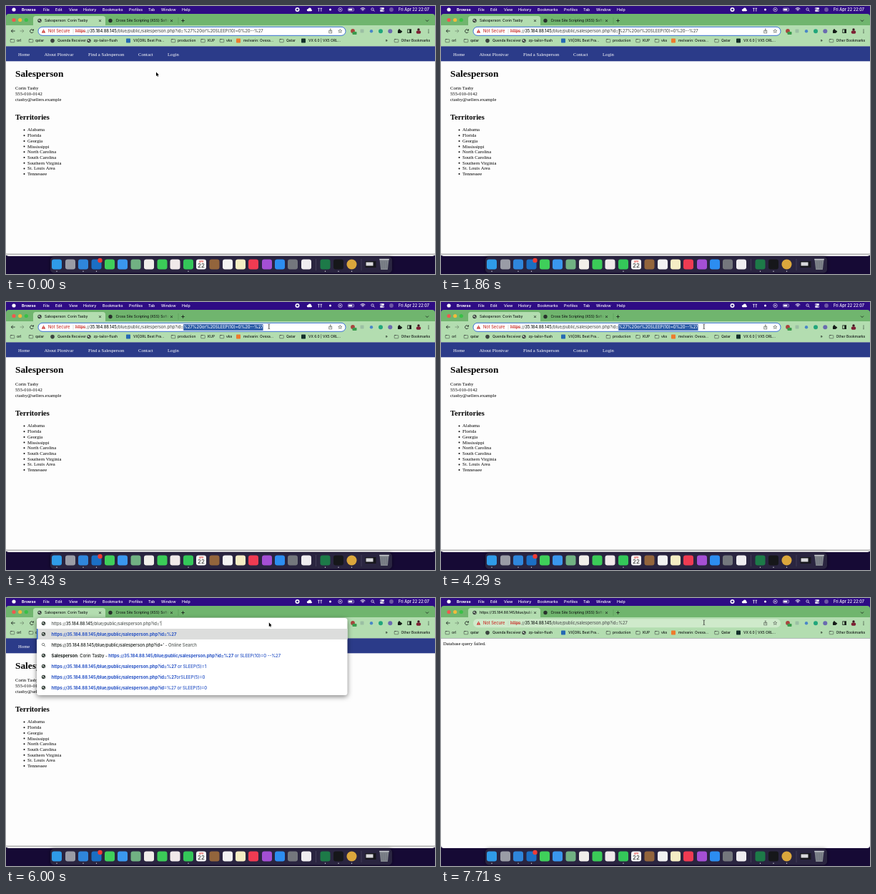
Write an HTML page with a canvas that moves like this. It is 600x375 px and loops after 8000 ms.

```html
<!DOCTYPE html>
<html lang="en">
<head>
<meta charset="utf-8">
<title>Salesperson</title>
<style>
html, body { margin: 0; width: 100%; height: 100%; overflow: hidden; background: #160a35; }
canvas { display: block; width: 600px; height: 375px; }
</style>
</head>
<body>
<canvas id="stage"></canvas>
<script>
const W = 600, H = 375, LOOP = 8000;
const canvas = document.getElementById('stage');
const ctx = canvas.getContext('2d');
const dpr = window.devicePixelRatio || 1;
canvas.width = W * dpr;
canvas.height = H * dpr;

const SANS = 'Inter, Roboto, sans-serif';
const SERIF = '"Liberation Serif", "Times New Roman", serif';
const INK = '#141a17', GRAY = '#525855', RED = '#c9302a', BLUE = '#2450c4';
const STRIP = '#70b56e', BAR = '#b3ddb0', MENU = '#2e0c84';

const HOST = '35.184.88.145';
const PATH = '/blue/public/salesperson.php?id=';
const URL_BASE = 'https://' + HOST + PATH;
const INJECTED = '%27%20or%20SLEEP(10)=0%20--%27';
const PERSON = 'Corin Tasby';
const URL_SIZE = 5.8, ROW_SIZE = 5.97;

// Times of the hard changes, in ms
const MOVE_END = 1500, DRAG = 1950, DRAG_END = 2430, RELEASE = 2860;
const TYPE = 5140, ENTER = 7000, FAILED = 7570;

const clamp = v => Math.max(0, Math.min(1, v));
const ease = v => v * v * (3 - 2 * v);
const mix = (a, b, k) => a + (b - a) * k;

function font(size, weight = 500, family = SANS) {
  ctx.font = `${weight} ${size}px ${family}`;
}

// Draws text centred vertically on y and returns its right edge
function text(s, x, y, size, color = INK, weight = 500, family = SANS) {
  font(size, weight, family);
  ctx.fillStyle = color;
  ctx.fillText(s, x, y + size * 0.35);
  return x + ctx.measureText(s).width;
}

function runs(parts, x, y, size) {
  for (const [s, color, weight] of parts) x = text(s, x, y, size, color, weight);
  return x;
}

function rect(x, y, w, h, color) {
  ctx.fillStyle = color;
  ctx.fillRect(x, y, w, h);
}

function round(x, y, w, h, r, color) {
  ctx.beginPath();
  ctx.roundRect(x, y, w, h, r);
  ctx.fillStyle = color;
  ctx.fill();
}

function shadowed(x, y, w, h, r, color, blur, drop) {
  ctx.save();
  ctx.shadowColor = 'rgba(0,0,0,.5)';
  ctx.shadowBlur = blur * dpr;
  ctx.shadowOffsetY = drop * dpr;
  round(x, y, w, h, r, color);
  ctx.restore();
}

function dot(x, y, r, color) {
  ctx.beginPath();
  ctx.arc(x, y, r, 0, 7);
  ctx.fillStyle = color;
  ctx.fill();
}

function arc(x, y, r, a, b, color, width = 0.7) {
  ctx.beginPath();
  ctx.arc(x, y, r, a, b);
  ctx.strokeStyle = color;
  ctx.lineWidth = width;
  ctx.stroke();
}

function line(points, color = INK, width = 0.8) {
  ctx.beginPath();
  for (let i = 0; i < points.length; i += 2) ctx.lineTo(points[i], points[i + 1]);
  ctx.strokeStyle = color;
  ctx.lineWidth = width;
  ctx.stroke();
}

function shape(points, color) {
  ctx.beginPath();
  for (let i = 0; i < points.length; i += 2) ctx.lineTo(points[i], points[i + 1]);
  ctx.closePath();
  ctx.fillStyle = color;
  ctx.fill();
}

function cross(x, y, r, color = INK) {
  line([x - r, y - r, x + r, y + r], color);
  line([x - r, y + r, x + r, y - r], color);
}

function fade(x0, x1) {
  const g = ctx.createLinearGradient(x0, 0, x1, 0);
  g.addColorStop(0, INK);
  g.addColorStop(1, 'rgba(20,26,23,0)');
  return g;
}

function globe(x, y) {
  dot(x, y, 2.7, '#333c38');
  shape([x - 2, y - 0.8, x - 0.2, y - 1.8, x + 0.6, y - 0.4, x - 0.8, y + 0.8], '#d3ded2');
  shape([x + 0.2, y + 0.9, x + 1.9, y + 0.1, x + 1, y + 1.9], '#d3ded2');
}

function folder(x) {
  ctx.beginPath();
  ctx.roundRect(x - 2.8, 46.6, 5.6, 4.2, 0.6);
  ctx.strokeStyle = '#465048';
  ctx.lineWidth = 0.6;
  ctx.stroke();
  rect(x - 2.8, 46, 2.4, 0.9, '#465048');
}

function lens(x, y, color) {
  arc(x - 0.5, y - 0.5, 1.7, 0, 7, color);
  line([x + 0.7, y + 0.7, x + 2.4, y + 2.4], color);
}

function menuBar() {
  rect(0, 0, W, 28, MENU);
  const c = '#fff';
  dot(11, 5, 2.6, c);
  text('Browse', 22, 5, 5.4, c, 700);
  const items = [['File', 52], ['Edit', 69], ['View', 88], ['History', 108], ['Bookmarks', 135],
    ['Profiles', 172], ['Tab', 199], ['Window', 217], ['Help', 246]];
  for (const [s, x] of items) text(s, x, 5, 5.3, c);
  dot(407.5, 5, 3, c);
  round(406.3, 3.8, 2.4, 2.4, 0.4, MENU);
  dot(422.5, 5.6, 1.6, c);
  dot(424.8, 4.6, 2.2, c);
  round(421, 5, 7, 2.2, 1.1, c);
  for (const x of [437.4, 440.8]) {
    line([x - 1.3, 3.3, x + 1.3, 3.3], c);
    line([x, 3.3, x, 7.6], c);
  }
  dot(453.5, 5, 1.5, c);
  arc(467.5, 5, 2.7, 0, 7, c, 0.6);
  shape([466.7, 3.7, 468.9, 5, 466.7, 6.3], c);
  ctx.beginPath();
  ctx.roundRect(478.5, 3, 8, 4, 1);
  ctx.strokeStyle = c;
  ctx.lineWidth = 0.5;
  ctx.stroke();
  rect(479.3, 3.8, 5, 2.4, c);
  for (const r of [1.6, 3.2, 4.8]) arc(499, 7.4, r, -2.35, -0.8, c, 0.9);
  lens(513, 5, c);
  for (const y of [3.5, 6.6]) {
    round(523, y - 1.2, 6, 2.4, 1.2, c);
    dot(y < 5 ? 524.3 : 527.7, y, 0.7, MENU);
  }
  dot(539, 5, 2.9, '#6e58a4');
  text('Fri Apr 22 22:07', 549, 5, 5.6, c);
}

function tabs(t) {
  round(0, 11, W, 30, [4, 4, 0, 0], STRIP);
  dot(11, 19.5, 2.6, '#f0584f');
  dot(19.7, 19.5, 2.6, '#f2bc3a');
  dot(28.3, 19.5, 2.6, '#39c046');
  round(38, 14, 101, 18, 3.5, BAR);
  if (t >= ENTER && t < FAILED) {
    const a = t / 130;
    arc(47, 20.5, 2.4, a, a + 1.5, '#8cae8d', 0.6);
  } else globe(47, 20.5);
  text(t < FAILED ? 'Salesperson: ' + PERSON : 'https://35.184.88.145/blue/public', 54, 20.7, 4.95, fade(121, 129));
  cross(131.5, 20.6, 1.4);
  dot(146, 20.5, 2.7, '#28302c');
  text('Cross Site Scripting (XSS) Software', 153.5, 20.7, 4.95, fade(218, 228));
  cross(231.5, 20.6, 1.4);
  line([241, 16, 241, 25], '#4d8d4c', 0.4);
  line([245.2, 20.5, 249.8, 20.5]);
  line([247.5, 18.2, 247.5, 22.8]);
  line([587, 19.5, 589, 21.5, 591, 19.5]);
}

function toolbar(t) {
  rect(0, 27, W, 29.5, BAR);
  line([12.6, 35, 7.4, 35]);
  line([9.7, 32.6, 7.3, 35, 9.7, 37.4]);
  line([19.6, 35, 24.8, 35], '#728b70');
  line([22.5, 32.6, 24.9, 35, 22.5, 37.4], '#728b70');
  if (t >= ENTER && t < FAILED) cross(36, 35, 2.1);
  else {
    arc(36, 35.2, 2.4, 0.4, 5.4, INK, 0.8);
    shape([36.4, 34.4, 38.8, 34.4, 38.8, 32], INK);
  }
  address(t);

  dot(485, 35, 2.9, '#a9443d');
  round(484.5, 36, 6, 4, 0.8, '#3a9b4c');
  round(495.5, 32.5, 5, 5, 1, '#9bbfa3');
  dot(511, 35.2, 2.2, '#4a86c8');
  dot(524, 35.2, 3, '#21a67b');
  dot(537.3, 35.2, 3, '#6a6bb0');
  round(548, 33.8, 4.6, 4.2, 0.4, INK);
  dot(550, 33.4, 1.2, INK);
  dot(553, 35.8, 1.1, INK);
  ctx.strokeStyle = INK;
  ctx.lineWidth = 0.8;
  ctx.strokeRect(561.8, 32.8, 4.8, 4.8);
  rect(564.2, 32.8, 2.4, 4.8, INK);
  dot(577, 33, 1.7, '#3a1420');
  round(573.8, 34.4, 6.4, 4.4, 1.8, '#7d1f33');
  for (const y of [33, 35.2, 37.4]) dot(591, y, 0.6, INK);

  bookmarks();
}

function address(t) {
  const focused = t < ENTER;
  round(45, 29.3, 430, 12, 6, focused ? '#fff' : '#cfeacb');
  if (focused) {
    ctx.strokeStyle = '#3a70d4';
    ctx.lineWidth = 1;
    ctx.stroke();
  }
  const y = 35.3;
  if (t >= ENTER && t < FAILED) {
    arc(52.5, 35.2, 2.4, 0, 7, GRAY, 0.6);
    line([52.5, 34.8, 52.5, 36.7], GRAY);
    dot(52.5, 33.8, 0.4, GRAY);
    runs([[HOST, INK], [PATH + '%27', GRAY]], 59, y, URL_SIZE);
  } else {
    shape([52.5, 32.6, 55.2, 37.4, 49.8, 37.4], RED);
    rect(52.2, 34.2, 0.6, 1.6, '#fff');
    rect(52.2, 36.3, 0.6, 0.6, '#fff');
    text('Not Secure', 59, y, 5.7, RED);
    line([94, 32, 94, 38.6], '#b8c0b8', 0.5);
    const x = text('https', 97, y, URL_SIZE, RED);
    line([97, 35.6, x, 35.6], RED, 0.5);
    const end = runs([['://', GRAY], [HOST, INK], [PATH, GRAY]], x, y, URL_SIZE);
    text(t < ENTER ? INJECTED : '%27', end, y, URL_SIZE, GRAY);
    if (t >= DRAG && t < TYPE) selection(t, end, y);
  }
  ctx.strokeStyle = '#4a534b';
  ctx.lineWidth = 0.6;
  ctx.strokeRect(451.8, 34.3, 4, 3.6);
  line([453.8, 36.3, 453.8, 31.8], '#4a534b', 0.6);
  line([452.6, 33, 453.8, 31.8, 455, 33], '#4a534b', 0.6);
  const star = [];
  for (let i = 0; i <= 10; i++) {
    const r = i % 2 ? 1.2 : 2.7, a = i * Math.PI / 5 - Math.PI / 2;
    star.push(467.3 + r * Math.cos(a), 35.2 + r * Math.sin(a));
  }
  line(star, '#4a534b', 0.6);
}

function selection(t, x, y) {
  font(URL_SIZE);
  const reach = pointer(t).x - x;
  let n = 0;
  while (n < INJECTED.length && ctx.measureText(INJECTED.slice(0, n + 1)).width <= reach) n++;
  if (t >= DRAG_END) n = INJECTED.length;
  const part = INJECTED.slice(0, n);
  rect(x, 31, ctx.measureText(part).width, 8.8, '#2b5ba6');
  text(part, x, y, URL_SIZE, '#eef3fb');
}

function bookmarks() {
  const y = 48.6;
  // [label, text x, icon x, icon colour, square]; no colour means a folder
  const items = [
    ['orl', 15, 9], ['qatar', 41, 35], ['Quenda Receiver', 72, 65, '#3c4440'],
    ['zp-tailor-flush', 122.5, 116, 'globe'], ['VX|ORL Best Pra...', 178, 171, '#2569b3', 1],
    ['production', 240, 234], ['KUP', 282, 275.5], ['vks', 308, 302],
    ['melvarin: Ovexa...', 332, 325, '#ee7b2d', 1], ['Qatar', 392, 385.5],
    ['VX 6.0 | VX5 ORL...', 423, 416, '#122f2a', 1], ['Other Bookmarks', 552.5, 546]
  ];
  for (const [s, x, ix, color, square] of items) {
    if (!color) folder(ix);
    else if (color === 'globe') globe(ix, y);
    else if (square) round(ix - 3, y - 3, 6, 6, 0.8, color);
    else dot(ix, y, 2.8, color);
    text(s, x, y, 4.9);
  }
  text('»', 530.5, y - 0.3, 5.5);
}

function page(t) {
  round(0, 56.5, W, 293.5, [0, 0, 4, 4], '#fdfdfd');
  const serif = (s, x, y, size = 6.67, color = '#000', weight = 400) => text(s, x, y, size, color, weight, SERIF);
  if (t >= FAILED) {
    serif('Database query failed.', 3, 64);
    return;
  }
  rect(0, 56.5, W, 20.8, '#2b3b89');
  const links = [['Home', 17], ['About Plonivar', 53.5], ['Find a Salesperson', 115], ['Contact', 185], ['Login', 226]];
  for (const [s, x] of links) serif(s, x, 67.5, 6.67, '#fff');
  serif('Salesperson', 13, 94, 13.33, '#000', 700);
  [PERSON, '555-010-0142', 'ctasby@sellers.example'].forEach((s, i) => serif(s, 13, 114.8 + i * 7.7));
  serif('Territories', 13, 155.5, 10.45, '#000', 700);
  const places = ['Alabama', 'Florida', 'Georgia', 'Mississippi', 'North Carolina', 'South Carolina',
    'Southern Virginia', 'St. Louis Area', 'Tennessee'];
  places.forEach((s, i) => {
    const y = 173.1 + i * 7.7;
    dot(25.5, y + 0.4, 1, '#000');
    serif(s, 30, y);
  });
  rect(0, 346, W, 3, '#dedede');
  rect(0, 346.8, W, 1, '#b4b4b4');
}

function popup() {
  shadowed(43, 28, 434.5, 108, 3.5, '#fff', 7, 2);
  rect(43, 43, 434.5, 15, '#dcdddc');
  round(43, 43, 1.5, 15, [0, 1, 1, 0], '#2f6ad6');
  const x = 63.5;
  globe(52.5, 35.5);
  const caret = runs([['https://', GRAY], [HOST, INK], [PATH + "'", GRAY]], x, 35.5, URL_SIZE);
  line([caret + 0.4, 32, caret + 0.4, 38.6], INK, 0.5);
  const hit = [URL_BASE + '%27', BLUE, 700];
  const rows = [
    [hit],
    [[URL_BASE + "'", INK], [' - Online Search', GRAY]],
    [['Salesperson', INK, 700], [': ' + PERSON + ' - ', INK], hit, [' or SLEEP(10)=0 --%27', BLUE]],
    [hit, [' or SLEEP(5)=1', BLUE]],
    [hit, ['orSLEEP(5)=0', BLUE]],
    [[URL_BASE.slice(0, -1), BLUE, 700], ['=%27 or SLEEP(5)=0', BLUE]]
  ];
  rows.forEach((row, i) => {
    const y = 50.5 + i * 15;
    if (i === 1) lens(52.5, y, GRAY);
    else globe(52.5, y);
    runs(row, x, y, ROW_SIZE);
  });
}

function dock() {
  shadowed(62, 351, 478, 22.5, 5, '#2a2540', 5, 0);
  const icons = [
    [71, '#2f9be8'], [90, '#9a9ca6'], [108, '#2f86dc'], [126.5, '#1b6fc4'], [145, '#3fcf5a'],
    [163, '#3a97ee'], [181.5, '#71b183'], [200, '#f1eeea'], [218.5, '#3bcb58'], [236.5, '#f0e9ea'],
    [255, '#34c759'], [273, '#f8f8f8'], [291.5, '#93653c'], [310, '#f2f2f2'], [328, '#f5edc4'],
    [346, '#ef3b52'], [365, '#a44fd4'], [383, '#2c8df0'], [401, '#74777d'], [420, '#efedf0'],
    [446.5, '#1d7a48'], [465, '#16171a']
  ];
  for (const [x, color] of icons) round(x - 7, 354.5, 14, 14, 3.2, color);
  dot(483.5, 361.5, 7, '#dba73c');
  dot(131.5, 356, 3.2, '#ef3c35');
  ctx.textAlign = 'center';
  text('APR', 273, 357.6, 3.2, '#e5413b', 600);
  text('22', 273, 363.3, 8, '#222', 400);
  ctx.textAlign = 'left';
  line([433.5, 354, 433.5, 370], '#5b566c', 0.5);
  line([497, 354, 497, 370], '#5b566c', 0.5);
  rect(502.5, 357, 15, 9, '#17171d');
  rect(503.5, 358.5, 10, 5, '#d9d9dc');
  shape([522.5, 355, 535.5, 355, 533.8, 369, 524.2, 369], '#7f838b');
  rect(522.2, 353.8, 13.6, 1.5, '#c9ccd1');
  for (const x of [526, 529, 532]) line([x, 357, x, 367], '#5f646d', 0.5);
  for (const x of [71, 108, 126.5, 255, 446.5, 465, 483.5]) dot(x, 371.3, 0.7, '#d4d0dc');
}

function pointer(t) {
  const k = ease(clamp((t - 280) / (MOVE_END - 280)));
  const d = ease(clamp((t - DRAG) / (DRAG_END - DRAG)));
  return { x: mix(mix(210, 249.3, k), 367.8, d), y: mix(mix(95, 36, k), 34.3, d) };
}

function cursor(t) {
  const { x, y } = pointer(t);
  if (t >= DRAG && t < RELEASE) {
    dot(x, y, 6.4, 'rgba(255,255,255,.35)');
    arc(x, y, 6.4, 0, 7, '#333', 0.8);
  }
  const typing = t >= TYPE && t < ENTER;
  if (y > 42 || typing) {
    const ty = typing ? y : y - 2.6;
    const p = [x, ty, x, ty + 5.7, x + 1.3, ty + 4.6, x + 2.2, ty + 6.5, x + 3, ty + 6.1, x + 2.2, ty + 4.3, x + 3.9, ty + 4.2];
    line([...p, x, ty], '#fff', 0.9);
    shape(p, '#000');
  } else {
    line([x, y - 3, x, y + 3], '#222');
    for (const s of [-1, 1]) line([x - 1.4, y + s * 3.5, x, y + s * 2.8, x + 1.4, y + s * 3.5], '#222', 0.6);
  }
}

function draw(t) {
  ctx.setTransform(dpr, 0, 0, dpr, 0, 0);
  rect(0, 0, W, H, '#160a35');
  menuBar();
  tabs(t);
  toolbar(t);
  page(t);
  dock();
  if (t >= TYPE && t < ENTER) popup();
  cursor(t);
}

const start = performance.now();
function tick() {
  draw((performance.now() - start) % LOOP);
  requestAnimationFrame(tick);
}
tick();
</script>
</body>
</html>
```
